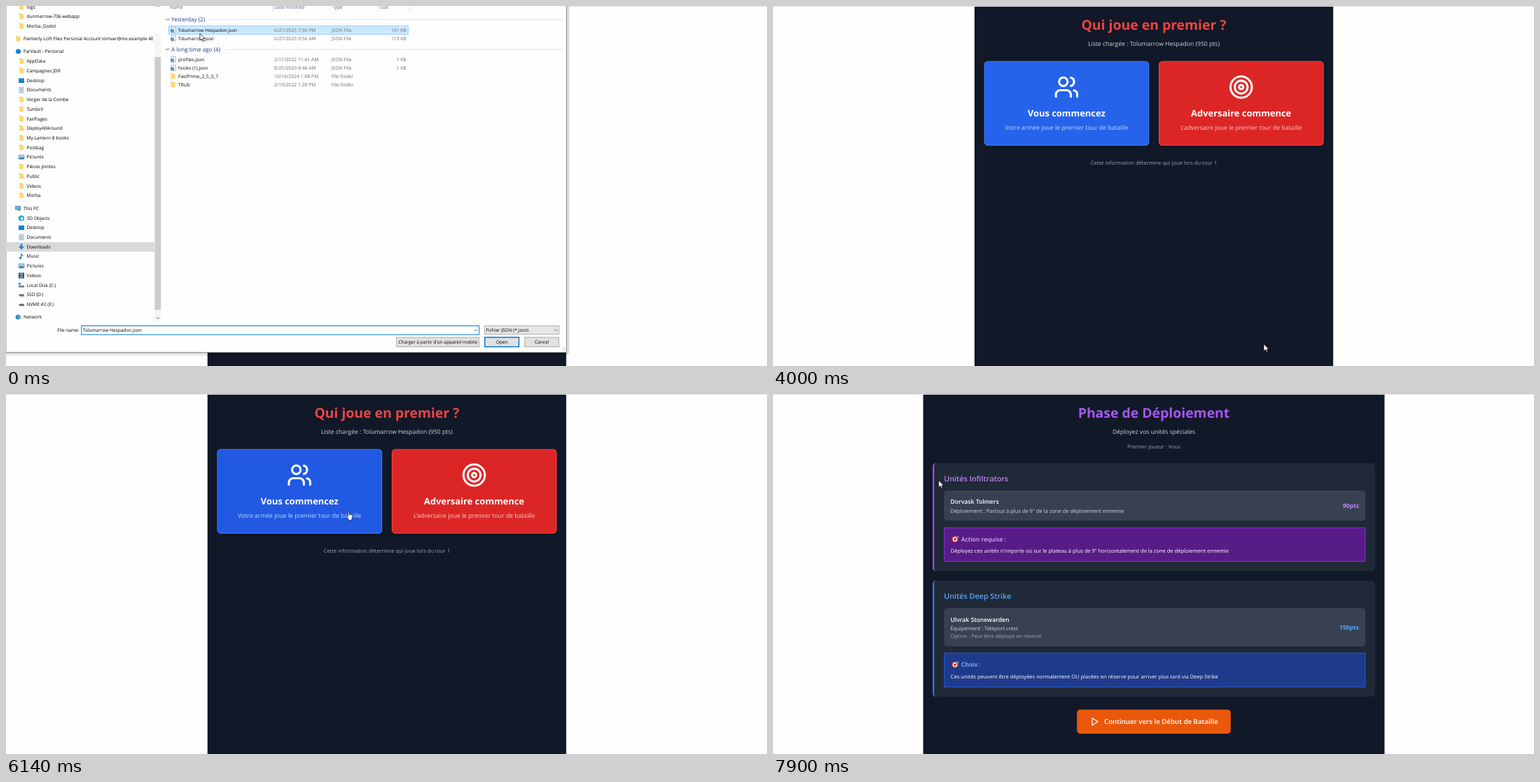
Recreate the animation shown at these times as an HTML page. Size 1087 px wide and 515 px high, loop 8000 ms.

```html
<!DOCTYPE html>
<html lang="fr">
<head>
<meta charset="utf-8">
<title>Assistant de Jeu</title>
<style>
html, body { margin: 0; width: 100%; height: 100%; overflow: hidden; background: #fefefe; }
svg { display: block; width: 1087px; height: 515px; }
text { font-family: "Open Sans", "Noto Sans", sans-serif; text-rendering: geometricPrecision; white-space: pre; }
</style>
</head>
<body>
<svg id="stage" viewBox="0 0 1087 515"></svg>
<script>
const LOOP = 8000;
const MID = 544;
// Web page type sizes
const XS = 7.54, BASE = 8.62, LG = 9.7, XL = 10.78, XXL = 12.93, HUGE = 19.4;
// File dialog type sizes
const UI = 6.55, COL = 6.8, GROUP = 8.1;
const INK = '#000';

const esc = s => s.replace(/&/g, '&amp;').replace(/</g, '&lt;');
const text = (x, y, s, size, fill, weight = 400, anchor = 'start', extra = '') =>
  `<text x="${x}" y="${y}" font-size="${size}" fill="${fill}" font-weight="${weight}" text-anchor="${anchor}" ${extra}>${esc(s)}</text>`;
const mid = (y, s, size, fill, weight, x = MID) => text(x, y, s, size, fill, weight, 'middle');
const rect = (x, y, w, h, fill, extra = '') =>
  `<rect x="${x}" y="${y}" width="${w}" height="${h}" fill="${fill}" ${extra}/>`;
const line = (d, color, w = 1) => `<path d="${d}" fill="none" stroke="${color}" stroke-width="${w}"/>`;
const group = (id, body, extra = '') => `<g id="${id}" ${extra}>${body}</g>`;

// Line icons on a 24 unit grid, centred at cx, cy
const ICONS = {
  users: '<path d="M16 21v-2a4 4 0 0 0-4-4H6a4 4 0 0 0-4 4v2M22 21v-2a4 4 0 0 0-3-3.87M16 3.13a4 4 0 0 1 0 7.75"/><circle cx="9" cy="7" r="4"/>',
  target: '<circle cx="12" cy="12" r="10"/><circle cx="12" cy="12" r="6"/><circle cx="12" cy="12" r="2"/>',
  upload: '<path d="M21 15v4a2 2 0 0 1-2 2H5a2 2 0 0 1-2-2v-4M17 8l-5-5-5 5M12 3v12"/>',
  play: '<path d="M5 3l14 9-14 9z"/>'
};
const icon = (name, cx, cy, size, color) => {
  const k = size / 24;
  return `<g transform="translate(${cx - size / 2} ${cy - size / 2}) scale(${k})" fill="none" stroke="${color}"
    stroke-width="2" stroke-linecap="round" stroke-linejoin="round">${ICONS[name]}</g>`;
};

// Small dialog icons, drawn around 0,0
const SMALL = {
  folder: rect(-2.8, -4, 3, 2, '#e9b949') + rect(-2.8, -3.2, 6, 7, '#ffd870', 'rx=".4"'),
  dot: '<circle r="3.6" fill="#1b84d8"/>',
  screen: rect(-4, -3, 8, 6.2, '#1787d8') + rect(-4, 2, 8, 1.2, '#0b5ea8'),
  page: rect(-3, -4, 6, 8, '#eef2f5', 'stroke="#8b9aa8" stroke-width=".7"') + line('M-1.8-1.8h3.6M-1.8 0h3.6M-1.8 1.8h3.6', '#5a86ad', .8),
  picture: rect(-4, -3, 8, 6, '#9fd2f3', 'stroke="#7d8f9d" stroke-width=".7"') + '<path d="M-3.6 2.6L-1-.2 1 1.4 2-.2l1.6 2.8z" fill="#29699a"/>',
  pc: rect(-4, -3, 7, 4.6, '#58b7e8', 'stroke="#56728a" stroke-width=".7"') + rect(-1, 1.6, 4.5, 1.6, '#6f8291'),
  cube: '<path d="M-4-2l4-2 4 2v5l-4 1.4-4-1.4z" fill="#27a7c7"/><path d="M-1-1h3.4v3.6H-1z" fill="#d6f3fa"/>',
  down: '<path d="M-1.5-4h3v3.6h2.6L0 4-4.1-.4h2.6z" fill="#2a7fd4"/>',
  music: line('M-.3 2.4V-4c.4 2 2.8 1.8 2.4 4', '#1478cf', 1.1) + '<circle cx="-1.5" cy="2.5" r="1.6" fill="#1478cf"/>',
  film: rect(-4, -4, 8, 8, '#38424d') + rect(-2.3, -3.2, 4.6, 2.8, '#6fa4cc') + rect(-2.3, .4, 4.6, 2.8, '#8a8fb8'),
  disk: '<path d="M-4 .4l2-1.2h5.4L4 .8v1.6h-6z" fill="#676d73"/>' + rect(1.4, 1, 1.4, .8, '#7fe08a'),
  system: rect(-4, -3.4, 3, 3, '#2a96e0') + '<path d="M-4 .6h8v2.6h-8z" fill="#70777d"/>',
  net: '<circle cx="-.4" r="3.4" fill="#2c8fcf"/>' + rect(0, -1, 4, 3, '#6aa6c9'),
  json: rect(-2.4, -4, 6.2, 7.8, '#f4f8fa', 'stroke="#94a3ae" stroke-width=".7"') + rect(-3.4, -1, 4.8, 4.4, '#5f93ac')
};
const small = (name, x, y) => `<g transform="translate(${x} ${y})">${SMALL[name]}</g>`;
const chevron = (x, y, color = '#444', r = 2) => line(`M${x - r} ${y - r / 2}l${r} ${r}l${r}-${r}`, color, .9);

function sidebar() {
  const row = (y, kind, label, x = 22) => small(kind, x, y) + text(x + 7.5, y + 2.3, label, UI, INK);
  const rows = (y0, step, list) => list.map((s, i) => {
    const [label, kind = 'folder'] = s.split('|');
    return row(y0 + i * step, kind, label);
  }).join('');
  return rect(0, 337.8, 212, 13.6, '#d9d9d9')
    + rows(1.2, 13.7, ['logs', 'dunmarrow-70k-webapp', 'Morba_Godot'])
    + `<g clip-path="url(#tree)">${row(47, 'folder', 'Painterly Loft Files Personal Account lomvar@mx.example 4E', 17.5)}</g>`
    + row(65, 'dot', 'FarVault - Personal', 17.5)
    + rows(79, 13.71, ['AppData', 'Campagnes JDR', 'Desktop|screen', 'Documents|page', 'Verger de la Combe', 'Tumbril',
      'FairPages', 'DeployAllAround', 'My Lantern 8 books', 'Postbag', 'Pictures|picture', 'Pièces jointes', 'Public', 'Videos', 'Morba'])
    + row(289.5, 'pc', 'This PC', 17.5)
    + rows(303.2, 13.73, ['3D Objects|cube', 'Desktop|screen', 'Documents|page', 'Downloads|down', 'Music|music', 'Pictures|picture',
      'Videos|film', 'Local Disk (C:)|system', 'SSD (D:)|disk', 'NVME #2 (E:)|disk'])
    + row(445, 'net', 'Network', 17.5)
    + rect(212, 40, 9.5, 411, '#f6f6f6') + rect(212.5, 73, 8.7, 361.5, '#cdcdcd')
    + chevron(217, 446.5) + line('M215 1l2-2 2 2', '#444', .9);
}

function fileList() {
  const file = (y, kind, name, date, type, size) => small(kind, 238.5, y) + text(246, y + 2.4, name, UI, INK)
    + text(383, y + 2.4, date, COL, '#6d6d6d') + text(465, y + 2.4, type, COL, '#6d6d6d')
    + text(572, y + 2.4, size, COL, '#6d6d6d', 400, 'end');
  const heading = (y, label, x) => chevron(231, y, '#555', 2.6) + text(236, y + 3, label, GROUP, '#1e3c87') + line(`M${x} ${y + .5}H797`, '#e3e3e3');
  const heads = [[234, 'Name'], [383, 'Date modified'], [466, 'Type'], [534, 'Size']];
  return heads.map(([x, s]) => text(x, 4.3, s, UI, '#4c607a')).join('')
    + [380.5, 462.5, 531.5, 576.5].map(x => line(`M${x} -8V8`, '#e2e2e2')).join('')
    + heading(19.2, 'Yesterday (2)', 288) + heading(61.7, 'A long time ago (4)', 314)
    + rect(232.5, 28.5, 342, 12, '#cce8ff', 'id="picked" stroke="#99d1ff"')
    + file(34.2, 'json', 'Tolumarrow Hespadon.json', '6/27/2025 7:30 PM', 'JSON File', '101 KB')
    + file(46.3, 'json', 'Tolumarrow.json', '6/27/2025 9:56 AM', 'JSON File', '113 KB')
    + file(76.4, 'json', 'profiles.json', '2/11/2022 11:41 AM', 'JSON File', '1 KB')
    + file(88.5, 'json', 'hooks (1).json', '8/25/2020 8:46 AM', 'JSON File', '1 KB')
    + file(100.5, 'folder', 'FastPrime_2_5_0_7', '10/16/2024 1:08 PM', 'File folder', '')
    + file(112.5, 'folder', 'TRLib', '2/19/2022 1:28 PM', 'File folder', '');
}

function dialog() {
  const button = (x, w, label, id) => rect(x, 474, w, 13.5, '#e1e1e1', `id="${id}" stroke="#adadad"`)
    + mid(483.2, label, UI, INK, 400, x + w / 2);
  return rect(-4, -20, 810, 521, '#000', 'opacity=".05" rx="6"') + rect(-2, -20, 806, 518.5, '#000', 'opacity=".1" rx="4"')
    + rect(0, -20, 800.5, 515.5, '#fefefe', 'stroke="#8f8f8f"')
    + rect(107, 451.5, 577, 43.3, '#f0f0f0', 'id="panel"')
    + sidebar() + fileList()
    + text(104.5, 466, 'File name:', UI, INK, 400, 'end')
    + rect(107.8, 457.5, 568, 12.6, '#fff', 'id="field"')
    + rect(109.2, 459, 86, 9.4, '#0078d7', 'id="mark"')
    + text(109.7, 466.2, 'Tolumarrow Hespadon.json', UI, INK, 400, 'start', 'id="chosen"')
    + chevron(671, 463.8)
    + rect(683.5, 457.5, 106.5, 12, '#e6e6e6', 'stroke="#b4b4b4"') + text(685.6, 466, 'Fichier JSON (*.json)', UI, INK) + chevron(785.3, 463.6)
    + button(557.8, 118, "Charger à partir d'un appareil mobile", 'mobile')
    + button(684, 48.6, 'Open', 'open') + button(740.8, 49, 'Cancel', 'cancel')
    + [[798, 488], [796, 490.5], [798, 490.5], [794, 493], [796, 493], [798, 493]].map(([x, y]) => rect(x - .5, y - .5, 1, 1, '#aaa')).join('');
}

const narrowPage = () => rect(287.8, 0, 512.4, 515, '#111827');

function importPage() {
  return narrowPage()
    + mid(34, 'Assistant de Jeu Dunmarrow 70K', HUGE, '#ef4444', 700)
    + mid(56.5, "Importez votre liste d'armée depuis DawnMuster.eu pour commencer", BASE, '#d1d5db')
    + rect(302, 79.3, 484.3, 154.4, '#1f2937', 'rx="4.6" stroke="#4b5563" stroke-width="1.15" stroke-dasharray="3.4 2.2"')
    + icon('upload', MID, 116, 36.6, '#9ca3af')
    + mid(156.3, 'Importer votre liste', XL, '#fff', 600)
    + mid(174.6, 'Fichier JSON exporté depuis DawnMuster.eu', BASE, '#9ca3af')
    + rect(488.3, 187, 111.4, 27.6, '#dc2626', 'rx="4.6"')
    + icon('upload', 508, 200.8, 11.4, '#fff') + text(518, 204, 'Choisir un fichier', BASE, '#fff')
    + mid(262.6, 'Format supporté : JSON de DawnMuster.eu', BASE, '#9ca3af')
    + mid(279.3, "L'assistant vous guidera phase par phase pendant votre partie", XS, '#9ca3af');
}

function turnPage() {
  const card = (x, id, edge, pic, title, note, tone) => {
    const c = x + 117.7;
    return rect(x - 1, 82, 237.4, 121, '#000', 'opacity=".12" rx="6"')
      + rect(x + .5, 79.2, 234.6, 120, '#000', `id="${id}" rx="4.6" stroke="${edge}" stroke-width="1.15"`)
      + icon(pic, c, 116, 36.6, '#fff') + mid(158.4, title, XXL, '#fff', 700, c) + mid(176.8, note, BASE, tone, 400, c);
  };
  return narrowPage()
    + mid(34, 'Qui joue en premier ?', HUGE, '#ef4444', 700)
    + mid(56.5, 'Liste chargée : Tolumarrow Hespadon (950 pts)', BASE, '#d1d5db')
    + card(301.6, 'blue', '#3b82f6', 'users', 'Vous commencez', 'Votre armée joue le premier tour de bataille', '#bfdbfe')
    + card(551, 'red', '#ef4444', 'target', 'Adversaire commence', "L'adversaire joue le premier tour de bataille", '#fecaca')
    + mid(226.7, 'Cette information détermine qui joue lors du tour 1', XS, '#9ca3af');
}

function deployPage() {
  const section = (y, h, edge) => `<path d="M232.6 ${y}H855.6a4.6 4.6 0 0 1 4.6 4.6v${h - 9.2}a4.6 4.6 0 0 1-4.6 4.6H232.6z" fill="#1f2937"/>`
    + `<path d="M232.8 ${y}a4.6 4.6 0 0 0-4.6 4.6v${h - 9.2}a4.6 4.6 0 0 0 4.6 4.6a4.6 4.6 0 0 1-2.3-4.6v-${h - 9.2}a4.6 4.6 0 0 1 2.3-4.6z" fill="${edge}"/>`
    + rect(230.5, y + 3, 4, h - 6, '#1f2937');
  const unit = (y, h) => rect(244.2, y, 602, h, '#374151', 'rx="4.6"');
  const notice = (y, fill, edge, title, tone, body) => rect(244.7, y + .5, 601.2, 48.3, fill, `stroke="${edge}" stroke-width=".9"`)
    + `<g transform="translate(260 ${y + 17})"><circle r="4.7" fill="#dc2f3c"/><circle r="3.2" fill="#fff"/><circle r="1.9" fill="#dc2f3c"/>`
    + line('M0 0L3.4-3.4', '#263238', .8) + '<path d="M2-2l.4-2 2-1.2.2 1.4 1.2.3-1.4 1.8z" fill="#35a7e0"/></g>'
    + text(268.8, y + 19.8, title, BASE, tone, 600) + text(253.8, y + 36.4, body, XS, '#fff');
  const name = (y, s) => text(253.4, y, s, BASE, '#fff', 600);
  const points = (y, s, tone) => text(837, y, s, BASE, tone, 700, 'end');
  return rect(214.5, 0, 659, 515, '#111827')
    + mid(34, 'Phase de Déploiement', HUGE, '#a855f7', 700)
    + mid(56.5, 'Déployez vos unités spéciales', BASE, '#d1d5db')
    + mid(77.8, 'Premier joueur : Vous', XS, '#9ca3af')
    + section(99, 154.3, '#a855f7') + text(244.2, 125.2, 'Unités Infiltrators', XL, '#c084fc', 600)
    + unit(138, 43.3) + name(157.4, 'Dorvask Tolmers')
    + text(253.4, 169.6, 'Déploiement : Partout à plus de 9" de la zone de déploiement ennemie', XS, '#d1d5db')
    + points(163, '90pts', '#c084fc')
    + notice(190.8, '#581c87', '#9333ea', 'Action requise :', '#d8b4fe',
      'Déployez ces unités n\'importe où sur le plateau à plus de 9" horizontalement de la zone de déploiement ennemie')
    + section(267, 166, '#3b82f6') + text(244.2, 293.4, 'Unités Deep Strike', XL, '#60a5fa', 600)
    + unit(306.3, 54.7) + name(325.6, 'Ulvrak Stonewarden')
    + text(253.4, 337.7, 'Équipement : Teleport crest', XS, '#d1d5db')
    + text(253.4, 349.2, 'Option : Peut être déployé en réserve', XS, '#9ca3af')
    + points(337.2, '150pts', '#60a5fa')
    + notice(370.3, '#1e3a8a', '#2563eb', 'Choix :', '#93c5fd',
      'Ces unités peuvent être déployées normalement OU placées en réserve pour arriver plus tard via Deep Strike')
    + rect(434.2, 451.5, 219.6, 34.4, '#ea580c', 'rx="4.6"')
    + icon('play', 460, 468.7, 13.7, '#fff') + text(473, 472.4, 'Continuer vers le Début de Bataille', LG, '#fff', 600);
}

const pointers =
  group('arrow', '<path d="M0 0V10.2L2.4 8 4 11.6 5.6 10.9 4.1 7.5H7.3Z" fill="#fff" stroke="#000" stroke-width=".7"/>')
  + group('hand', '<path d="M1.8.9c0-1.2 1.7-1.2 1.7 0v3.6l3.3.8c.8.2 1.1.7 1 1.5L7.2 10l-.5 2.6H2.6L2 10.8-.2 7.6c-.5-.9.6-1.6 1.3-.9l.7.8z" fill="#fff" stroke="#000" stroke-width=".6"/>')
  + group('beam', line('M-2-5h1.5l.5.5.5-.5H2M0-4.5v9M-2 5h1.5l.5-.5.5.5H2', '#b5b5b5', .8));

document.getElementById('stage').innerHTML = '<defs><clipPath id="tree"><path d="M0 0H212.3V515H0z"/></clipPath></defs>'
  + rect(0, 0, 1087, 515, '#fefefe')
  + group('import', importPage()) + group('turn', turnPage()) + group('deploy', deployPage())
  + rect(0, 0, 1087, 1, '#e2e2e2') + group('dialog', dialog()) + pointers;

const $ = id => document.getElementById(id);
const show = (id, on) => $(id).setAttribute('display', on ? 'inline' : 'none');
const set = (id, attrs) => { for (const k in attrs) $(id).setAttribute(k, attrs[k]); };
const at = (steps, t) => steps.reduce((last, s) => t >= s[0] ? s : last);

const PAGE = [[0, 'import'], [4000, 'turn'], [7200, 'deploy']];
const CURSOR = [
  [0, 'arrow', 277, 39], [120, 'arrow', 296, 58], [260, 'arrow', 345, 110], [380, 'arrow', 440, 215],
  [500, 'arrow', 550, 330], [620, 'arrow', 638, 422], [740, 'arrow', 683, 472], [890, 'arrow', 692, 477],
  [1010, 'arrow', 699, 480], [1130, 'arrow', 702, 481], [3870, 'arrow', 701, 483.5],
  [4370, 'arrow', 700.5, 483.5], [4490, 'arrow', 700, 483],
  [4860, 'arrow', 699, 430], [4980, 'arrow', 695, 330], [5100, 'arrow', 688, 245], [5220, 'hand', 680, 196], [5340, 'hand', 676.5, 187],
  [5900, 'hand', 640, 180], [6020, 'arrow', 545, 172], [6140, 'hand', 487, 168], [6260, 'hand', 461, 167],
  [6570, 'beam', 464.3, 167], [7750, 'arrow', 405, 150], [7900, 'arrow', 236.6, 123.5]
];
const RED = [[0, '#dc2626'], [5220, '#cb2121'], [5340, '#b91c1c'], [6020, '#cb2121'], [6140, '#dc2626']];
const BLUE = [[0, '#2563eb'], [6140, '#2159e2'], [6260, '#1d4ed8']];

function render(t) {
  const page = at(PAGE, t)[1];
  PAGE.forEach(([, id]) => show(id, id === page));
  set('red', { fill: at(RED, t)[1] });
  set('blue', { fill: at(BLUE, t)[1] });

  const closing = t >= 3870, hover = t >= 1010;
  show('dialog', t < 4000);
  set('dialog', closing ? { transform: 'matrix(.9868 0 0 .9857 5 2.6)', opacity: .66 } : { transform: '', opacity: 1 });
  show('panel', t >= 260);
  set('panel', closing ? { x: 287, width: 513 } : { x: 107, width: 577 });
  set('picked', closing ? { fill: '#d0d0d0', stroke: '#d0d0d0' } : { fill: '#cce8ff', stroke: '#99d1ff' });
  set('field', { stroke: t < 120 ? '#0078d7' : '#7a7a7a', 'stroke-width': t < 120 ? 1 : .8 });
  set('open', { fill: closing ? '#cce4f7' : hover ? '#e5f1fb' : '#e1e1e1', stroke: '#0078d7', 'stroke-width': hover ? .8 : 1.5 });
  show('mark', closing);
  set('mark', { width: $('chosen').getComputedTextLength() + 1 });
  set('chosen', { fill: closing ? '#fff' : INK });

  const [, kind, x, y] = at(CURSOR, t);
  ['arrow', 'hand', 'beam'].forEach(id => show(id, id === kind));
  set(kind, { transform: `translate(${x} ${y})` });
}

const start = performance.now();
function tick() {
  render((performance.now() - start) % LOOP);
  requestAnimationFrame(tick);
}
tick();
</script>
</body>
</html>
```
